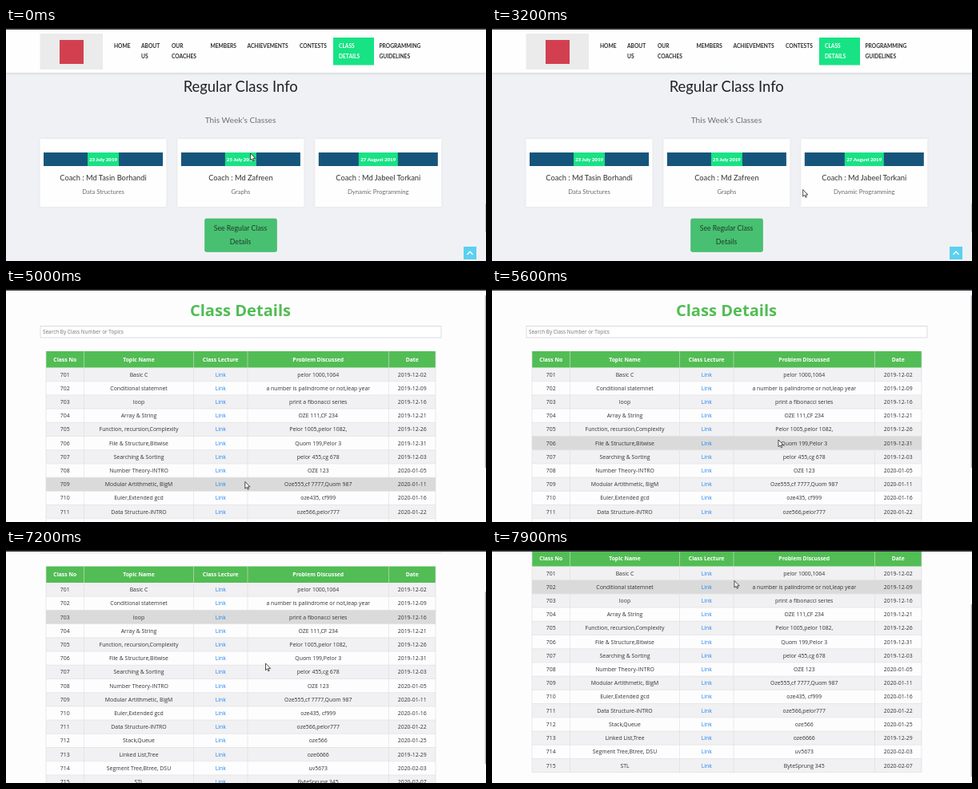
Write an HTML page that moves like this. It is 600 px wide and 292 px high and loops after 8000 ms.

```html
<!DOCTYPE html>
<html lang="en">
<head>
<meta charset="utf-8">
<title>Class pages</title>
<style>
  html, body { margin: 0; width: 100%; height: 100%; overflow: hidden; }
  svg { display: block; width: 600px; height: 292px; }
  #home { font-family: Lato, sans-serif; }
  #details { font-family: "Open Sans", sans-serif; }
  #bar { filter: drop-shadow(0 1px 1.5px #0002); }
  .card { filter: drop-shadow(0 0 1.5px #0001); }
</style>
</head>
<body>
<svg viewBox="0 0 600 292">
  <g id="home"></g>
  <g id="details"></g>
  <rect width="600" height="2" fill="#2b2a30"/>
  <g id="cursor" stroke="#222" stroke-width=".8" stroke-linejoin="round">
    <path id="arrow" fill="#fff" d="M0 0V8.6L2 6.9 3.4 9.8 4.7 9.2 3.4 6.4H6.2Z"/>
    <path id="hand" fill="#fff" d="M-1 0Q0-1 1 0V4L4.5 5V8L3.3 11H-1.5L-4 7Q-3.6 5.6-1 7Z"/>
    <path id="beam" fill="none" d="M-1.2-4H1.2M0-4V4M-1.2 4H1.2"/>
  </g>
</svg>
<script>
const $ = id => document.getElementById(id);

function add(parent, tag, attrs, content = '') {
  const el = document.createElementNS('http://www.w3.org/2000/svg', tag);
  for (const key in attrs) el.setAttribute(key, attrs[key]);
  el.textContent = content;
  return parent.appendChild(el);
}
const box = (parent, x, y, width, height, fill, more) =>
  add(parent, 'rect', { x, y, width, height, fill, ...more });
const text = (parent, x, y, size, fill, content, more) =>
  add(parent, 'text', { x, y, 'font-size': size, fill, 'text-anchor': 'middle', ...more }, content);
const BOLD = { 'font-weight': 700 };
const BLACK = { 'font-weight': 900 };
const LEFT = { 'text-anchor': 'start' };

// Home page
const home = $('home');
box(home, 0, 0, 600, 292, '#f0f1f5');
box(home, 0, 0, 600, 56, '#fefefe', { id: 'bar' });
box(home, 42.5, 7, 78.5, 45, '#ebebec');
box(home, 67, 15, 30, 30, '#d2404f');
box(home, 409, 12, 51, 34.5, '#17e384');
[[135, 'HOME'], [169, 'ABOUT', 'US'], [207, 'OUR', 'COACHES'], [255.5, 'MEMBERS'],
 [301.5, 'ACHIEVEMENTS'], [367, 'CONTESTS'], [416, 'CLASS', 'DETAILS'],
 [466.5, 'PROGRAMMING', 'GUIDELINES']].forEach(([x, ...lines]) =>
  lines.forEach((line, i) =>
    text(home, x, 24.6 + i * 13, 6.65, x === 416 ? '#fff' : '#2c2c30', line, { ...BOLD, ...LEFT })));
text(home, 293.2, 80, 18.4, '#222', 'Regular Class Info');
text(home, 293, 119, 10.2, '#707073', 'This Week’s Classes');

[['23 July 2019', 'Md Tasin Borhandi', 'Data Structures', 39],
 ['25 July 2019', 'Md Zafreen', 'Graphs', 39],
 ['27 August 2019', 'Md Jabeel Torkani', 'Dynamic Programming', 49]].forEach(([date, coach, topic, w], i) => {
  const mid = 121.5 + i * 171.9;
  box(home, mid - 79, 139, 158, 85, '#fefefe', { class: 'card' });
  box(home, mid - 74.5, 156, 149, 17, '#16557b');
  box(home, mid - w / 2, 156, w, 17, '#17e384');
  text(home, mid, 166.8, 6.2, '#fff', date, BLACK);
  text(home, mid, 190.5, 9.3, '#333', 'Coach : ' + coach);
  text(home, mid, 207.8, 7.7, '#6c6c70', topic);
});

box(home, 248.5, 239, 90, 41.5, '#48c071', { rx: 2, stroke: '#43b86b', 'stroke-width': .6 });
const label = add(home, 'g', {});
text(label, 293, 254.2, 8.7, 'inherit', 'See Regular Class');
text(label, 293, 270.6, 8.7, 'inherit', 'Details');
label.querySelectorAll('text').forEach(line => line.removeAttribute('fill'));
const dot = add(home, 'circle', { cx: 332.3, cy: 252, r: 1.6, fill: '#a9e8bf' });
box(home, 572, 274, 16, 16, '#5bd0f0');
add(home, 'path', { d: 'M576.5 284L580 280.3 583.5 284', fill: 'none', stroke: '#fff', 'stroke-width': 1.5 });
box(home, 599, 220, 1, 36, '#c4c4c8');
const status = box(home, 0, 289.6, 93, 2.4, '#2b2a30');

// Details page
const details = $('details');
const TOP = 98.5, ROW = 17.21;
const EDGES = [50, 97.5, 234.5, 302, 478.5, 537];
const middle = i => (EDGES[i] + EDGES[i + 1]) / 2;
const lessons = `Basic C|pelor 1000,1064|2019-12-02
Conditional statemnet|a number is palindrome or not,leap year|2019-12-09
loop|print a fibonacci series|2019-12-16
Array & String|OZE 111,CF 234|2019-12-21
Function, recursion,Complexity|Pelor 1005,pelor 1082,|2019-12-26
File & Structure,Bitwise|Quom 199,Pelor 3|2019-12-31
Searching & Sorting|pelor 455,cg 678|2019-12-03
Number Theory-INTRO|OZE 123|2020-01-05
Modular Artithmetic, BigM|Oze555,cf 7777,Quom 987|2020-01-11
Euler,Extended gcd|oze435, cf999|2020-01-16
Data Structure-INTRO|oze566,pelor777|2020-01-22
Stack,Queue|oze566|2020-01-25
Linked List,Tree|oze6666|2019-12-29
Segment Tree,Btree, DSU|uv5673|2020-02-03
STL|ByteSprung 345|2020-02-07`.split('\n').map(line => line.split('|'));

box(details, 0, 0, 600, 292, '#fefdfe');
const page = add(details, 'g', {});
text(page, 293, 34.3, 20.1, '#52bd54', 'Class Details', BOLD);
box(page, 43, 46.5, 501, 14.5, '#fff', { stroke: '#d4d4d6', 'stroke-width': .8 });
text(page, 46, 56.3, 6.4, '#757575', 'Search By Class Number or Topics', LEFT);

const rows = lessons.map(([topic, problem, date], n) => {
  const y = TOP + n * ROW;
  const row = box(page, 50, y, 487, ROW, '#fff');
  [701 + n, topic, 'Link', problem, date].forEach((cell, i) =>
    text(page, middle(i), y + 11.1, 6.9, i === 2 ? '#1c86f2' : '#333', cell));
  return row;
});
const END = TOP + lessons.length * ROW;
let grid = EDGES.map(x => `M${x} 78V${END}`).join('');
for (let n = 1; n <= lessons.length; n++) grid += `M50 ${TOP + n * ROW}H537`;
box(page, 50, 78, 487, 20.5, '#52bd54');
add(page, 'path', { d: grid, stroke: '#dcdcde', 'stroke-width': .6 });
['Class No', 'Topic Name', 'Class Lecture', 'Problem Discussed', 'Date'].forEach((head, i) =>
  text(page, middle(i), 90.8, 6.8, '#fff', head, BOLD));
const thumb = box(details, 598.7, 0, 1.3, 216, '#b4b4b8');

// Motion: [time, value, ...] keys with straight runs between them
const pointer = [[0, 305.5, 157], [300, 305.5, 158], [1300, 470, 163], [2800, 470, 163],
  [3700, 287, 252], [4900, 287, 252], [5500, 358, 189], [5600, 358, 189],
  [6300, 326, 145], [6500, 326, 145], [7100, 324.5, 142], [7300, 324.5, 142], [7900, 303, 38.5]];
const scrolling = [[0, 0], [7100, 0], [7200, 57.5], [7300, 78]];

function sample(keys, t) {
  const next = keys.findIndex(key => key[0] > t);
  if (next < 0) return keys[keys.length - 1].slice(1);
  const a = keys[next - 1], b = keys[next];
  const k = (t - a[0]) / (b[0] - a[0]);
  return a.slice(1).map((v, i) => v + (b[i + 1] - v) * k);
}
const show = (el, on) => el.setAttribute('visibility', on ? 'visible' : 'hidden');

function draw(t) {
  const [x, y] = sample(pointer, t);
  const [scroll] = sample(scrolling, t);
  const onDetails = t >= 5000;
  const onButton = !onDetails && x > 248 && x < 339 && y > 239;
  const onDate = !onDetails && x > 441 && y > 156 && y < 173;

  home.style.display = onDetails ? 'none' : '';
  details.style.display = onDetails ? '' : 'none';
  label.setAttribute('fill', onButton ? '#1552a8' : '#1f3d2c');
  show(dot, onButton);
  show(status, onButton && t >= 3900);

  // The highlight stays put until the pointer moves after scrolling.
  const hover = Math.floor((y + (t < 7400 ? 0 : scroll) - TOP) / ROW);
  rows.forEach((row, n) =>
    row.setAttribute('fill', n === hover ? '#dadada' : n % 2 ? '#fefdfe' : '#f1f0f2'));
  page.setAttribute('transform', `translate(0 ${-scroll})`);
  thumb.setAttribute('y', 8 + scroll * .77);

  $('cursor').setAttribute('transform', `translate(${x} ${y})`);
  show($('hand'), onButton);
  show($('beam'), onDate);
  show($('arrow'), !onButton && !onDate);
}

const start = performance.now();
function tick() {
  const t = (performance.now() - start) % 8000;
  draw(Math.floor(t / 100) * 100);
  requestAnimationFrame(tick);
}
tick();
</script>
</body>
</html>
```
